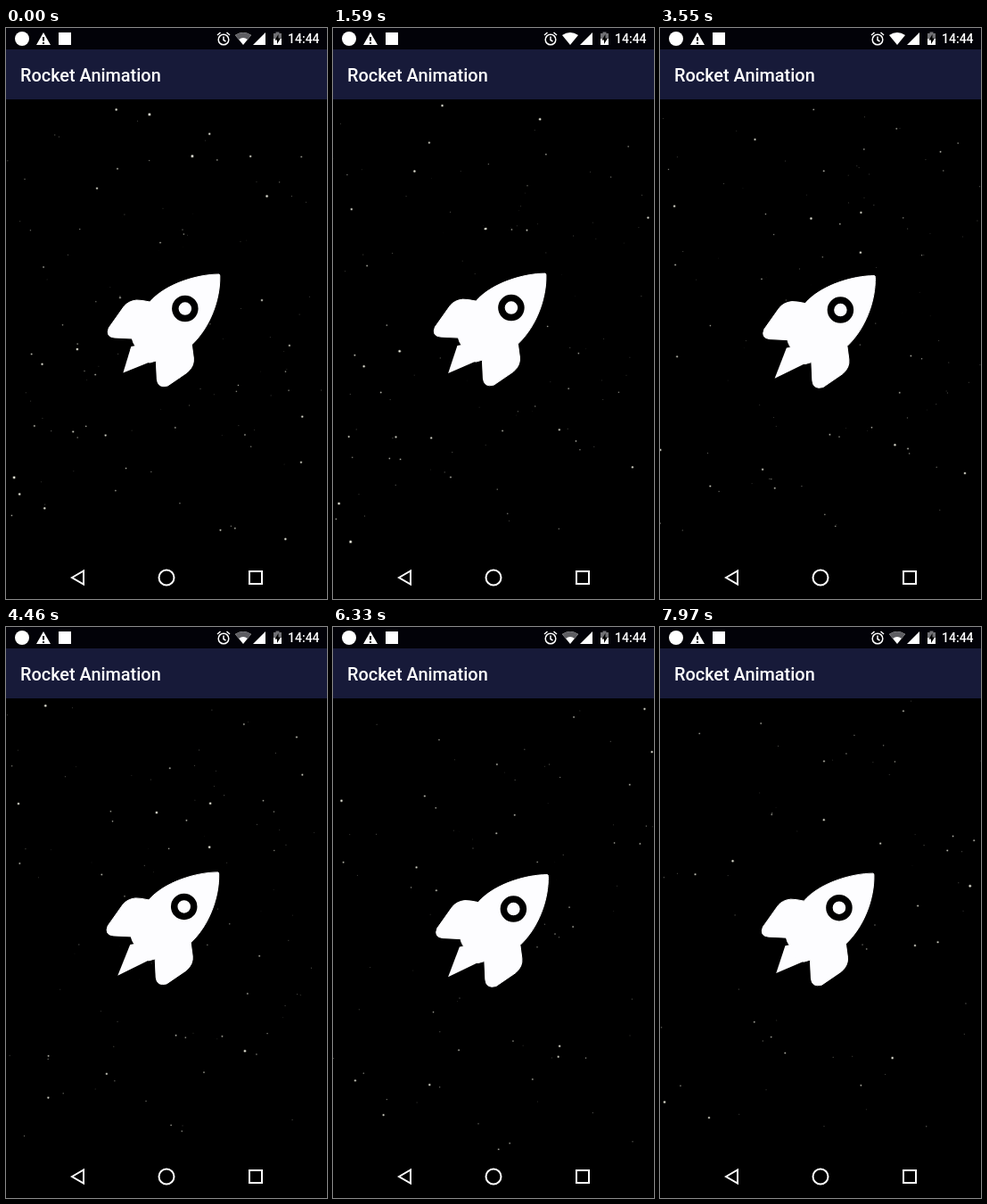
Animation, 360 px wide and 640 px high, one loop 8 s. Source, as an HTML page with a canvas:

```html
<!DOCTYPE html>
<html lang="en">
<head>
<meta charset="utf-8">
<title>Rocket Animation</title>
<style>
html, body { margin: 0; width: 100%; height: 100%; overflow: hidden; background: #000; }
canvas, svg { position: absolute; left: 0; top: 0; width: 360px; height: 640px; }
text { font-family: Roboto, sans-serif; font-weight: 500; fill: #fff; }
#wifiDim { animation: wifi 8s step-end infinite; }
@keyframes wifi { 0% { opacity: 1; } 5.5% { opacity: 0; } 48.75% { opacity: 1; } }
</style>
</head>
<body>
<canvas id="sky" width="360" height="640"></canvas>
<svg viewBox="0 0 360 640">
  <g id="rocket" fill="#fdfdff">
    <path id="flame"/>
    <path stroke="#fdfdff" stroke-linejoin="round" d="M238.500 276C214 276 178 287 161 307Q152 305 146 305Q137 306 132 312L115 336Q111 346 121 347L141 348Q142 353 145 357L152 373L161 375L168 373L169 394Q170 404 181 401L203 386Q211 379 210 370L208 355C229 335 240 304 239.500 278Q239.500 276 238.500 276Z"/>
    <circle cx="200.5" cy="314.5" r="11" fill="none" stroke="#000" stroke-width="7.5"/>
  </g>

  <rect width="360" height="24" fill="#020208"/>
  <rect y="24" width="360" height="56" fill="#171a39"/>
  <text x="16" y="60" font-size="19.9">Rocket Animation</text>

  <g fill="#fff">
    <circle cx="18" cy="12" r="8"/>
    <path fill-rule="evenodd" d="M42 5L50 19H34ZM41 10V14.5H43V10ZM41 16V18H43V16Z"/>
    <rect x="59" y="5" width="14" height="14"/>
    <g fill="none" stroke="#fff" stroke-width="1.5">
      <circle cx="244" cy="13" r="5.8"/>
      <path d="M244 9.5V13.5L246.5 15M237 8L240.5 5M251 8L247.5 5"/>
    </g>
    <path d="M257 8Q266 2 275 8L266 19Z"/>
    <path id="wifiDim" fill="#5e5e62" d="M257 8Q266 2 275 8L271 13Q266 9 261 13Z"/>
    <path d="M291 5V19H277Z"/>
    <path fill="#707074" d="M300 6H302.500V4.500H306.500V6H309V12H300Z"/>
    <path d="M300 12H309V19H300Z"/>
    <path fill="#000" d="M305.500 7L301.500 13.500H304V18L308 11.500H305.500Z"/>
  </g>
  <text x="316" y="17" font-size="14">14:44</text>

  <rect y="592" width="360" height="48"/>
  <g fill="none" stroke="#fff" stroke-width="2">
    <path d="M74 616L87 608.500V623.500Z"/>
    <circle cx="180" cy="616" r="8.500"/>
    <rect x="273" y="609" width="14" height="14"/>
  </g>
</svg>
<script>
const LOOP = 8, CX = 180, CY = 320;
const ctx = document.getElementById('sky').getContext('2d');
const rocket = document.getElementById('rocket');
const flame = document.getElementById('flame');

let seed = 41;
const rand = () => (seed = seed * 16807 % 2147483647) / 2147483647;

// Each star flies straight out from the centre and goes out at a random point
const stars = Array.from({ length: 260 }, () => {
  const dx = rand() * 380 - 190, dy = rand() * 540 - 270, glow = rand() ** 2;
  return {
    angle: Math.atan2(dy, dx), reach: Math.hypot(dx, dy),
    end: rand() * 12, life: 3 + rand() * 5, speed: 2 + 30 * rand() ** 2,
    size: .8 + 1.5 * glow, alpha: .3 + .7 * glow
  };
});

function dot(x, y, radius, alpha) {
  ctx.globalAlpha = alpha;
  ctx.beginPath();
  ctx.arc(x, y, radius, 0, 7);
  ctx.fill();
}

function drawStars(t) {
  ctx.clearRect(0, 0, 360, 640);
  ctx.fillStyle = '#fffff0';
  for (const { angle, reach, end, life, speed, size, alpha } of stars) {
    const r = reach - speed * (end - t);
    if (t > end || t < end - life || r < 12) continue;
    const grow = r / reach;
    const x = CX + r * Math.cos(angle), y = CY + r * Math.sin(angle);
    dot(x, y, size * grow * .85, alpha * grow * .35);
    dot(x, y, size * grow * .5, alpha * grow);
  }
}

function drawRocket(t) {
  const shake = 1.6 * Math.sin(18.14 * t);
  const thrust = .5 - .5 * Math.cos(2 * Math.PI * t / 9.5);
  rocket.setAttribute('transform', `translate(${shake + .3} ${shake})`);
  flame.setAttribute('d',
    `M140 357L${131 - 5 * thrust} ${386.5 + 5.5 * thrust}L162 374L150 355Z`);
}

function frame() {
  const t = performance.now() / 1000 % LOOP;
  drawStars(t);
  drawRocket(t);
  requestAnimationFrame(frame);
}
frame();
</script>
</body>
</html>
```
